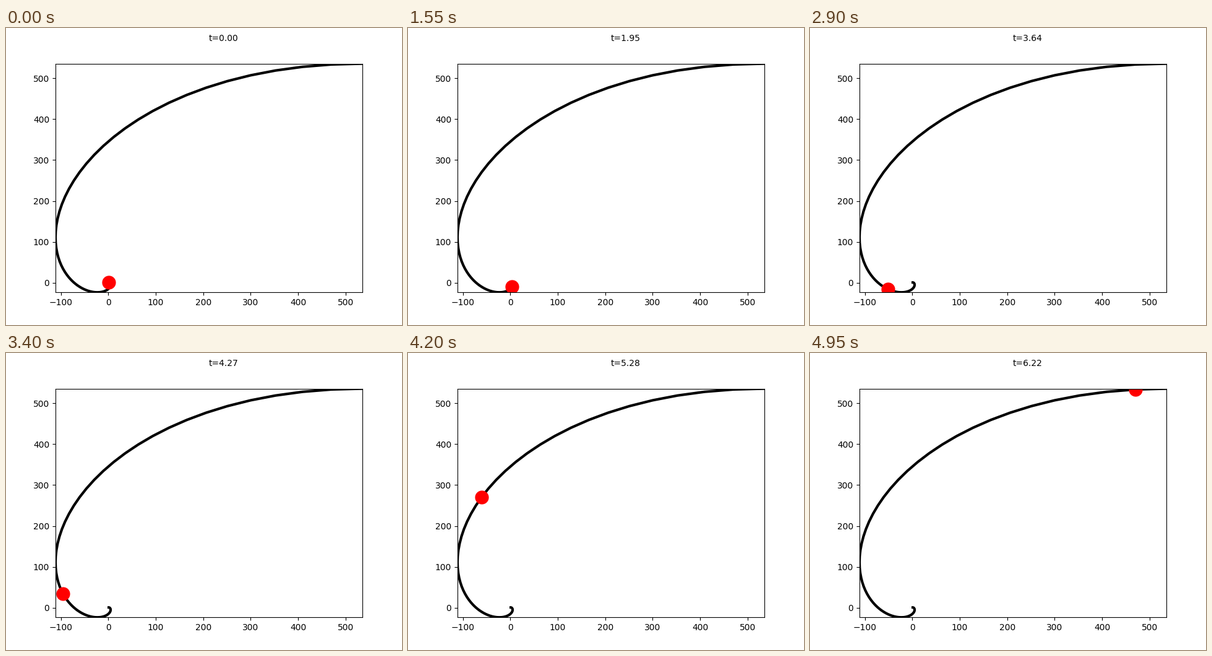
These frames come from a looping animation (640x480 px, 5 s). A matplotlib script:

```python
import numpy as np
import matplotlib.pyplot as plt
from matplotlib.animation import FuncAnimation

FRAMES = 100
INTERVAL = 50  # ms


def spiral(t):
    """Point on a logarithmic spiral, turned by 45 degrees."""
    r = np.exp(t)
    return r * (np.cos(t) + np.sin(t)), r * (np.cos(t) - np.sin(t))


times = np.linspace(0, 2 * np.pi, FRAMES + 1)
xs, ys = spiral(times)

fig, ax = plt.subplots(figsize=(6.4, 4.8), dpi=100)
ax.plot(xs, ys, color="black", lw=3)
ax.set_xlim(xs.min(), xs.max())
ax.set_ylim(ys.min(), ys.max())

ball, = ax.plot([], [], "o", color="red", ms=15)
label = ax.text(0.5, 1.1, "", transform=ax.transAxes)


def update(i):
    ball.set_data([xs[i]], [ys[i]])
    label.set_text(f"t={times[i]:.2f}")
    return ball, label


anim = FuncAnimation(fig, update, frames=FRAMES, interval=INTERVAL,
                     repeat=True, repeat_delay=0)
plt.show()
```
